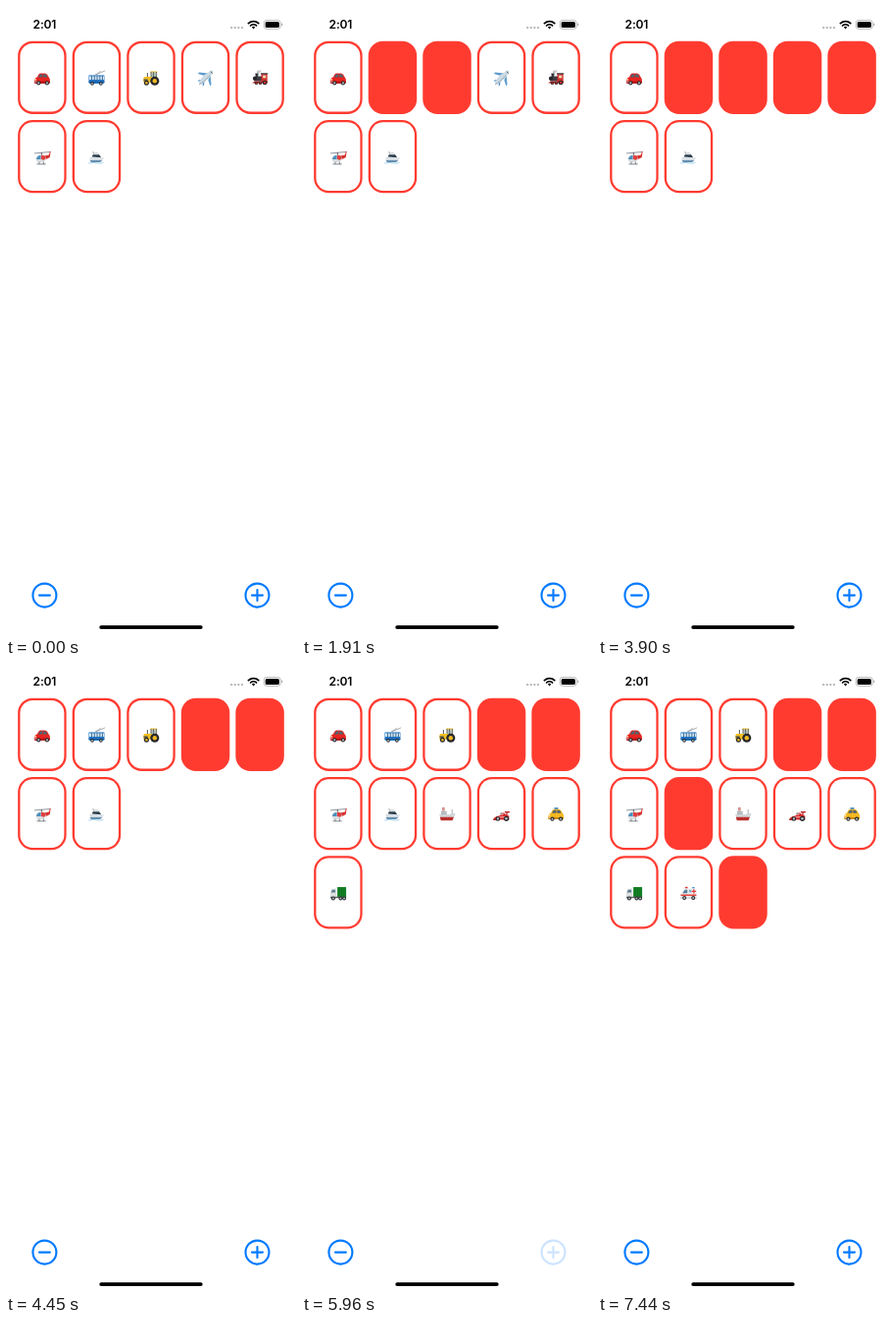
An HTML page that plays this animation: 296 by 640 pixels, repeating every 8 s.

```html
<!DOCTYPE html>
<html lang="en">
<head>
<meta charset="utf-8">
<title>Vehicle cards</title>
<style>
  html, body { margin: 0; width: 100%; height: 100%; overflow: hidden; background: #fff; }
  svg { display: block; width: 296px; height: 640px; }
  .clock { font: 600 12px Inter, Roboto, sans-serif; letter-spacing: -.15px; }
</style>
</head>
<body>
<svg id="stage" viewBox="0 0 296 640"></svg>
<script>
const LOOP = 8000;
const PT = 296 / 390; // device points to stage pixels
const RED = '#ff3b30', BLUE = '#007aff';

// Drawing helpers
const path = (d, fill) => `<path d="${d}" fill="${fill}"/>`;
const line = (d, color, w = 1) =>
  `<path d="${d}" fill="none" stroke="${color}" stroke-width="${w}" stroke-linecap="round" stroke-linejoin="round"/>`;
const dot = (x, y, r, fill) => `<circle cx="${x}" cy="${y}" r="${r}" fill="${fill}"/>`;
const box = (x, y, w, h, fill, r = 0) =>
  `<rect x="${x}" y="${y}" width="${w}" height="${h}" rx="${r}" fill="${fill}"/>`;
const wheel = (x, y, r = 2, hub = '#b9bec4') => dot(x, y, r, '#25272b') + dot(x, y, r * .5, hub);

const car = (paint, shade, extra = '') =>
  extra +
  path('M-8 2Q-7.8-.6-5.2-1L-3.4-4Q-2.9-4.9-1.6-4.9H2.8Q4.5-4.9 5.4-3.4L6.9-.7Q8 .2 8 2V4Q8 5.3 6.6 5.3H-6.8Q-8 5.3-8 4Z', paint) +
  path('M-8 3.4H8V4Q8 5.3 6.6 5.3H-6.8Q-8 5.3-8 4Z', shade) +
  path('M-4-1L-2.6-3.5Q-2.3-4-1.5-4H.4V-1Z', '#51626f') +
  path('M1.2-4H2.7Q3.9-4 4.5-3L5.5-1H1.2Z', '#51626f') +
  dot(-6.8, 1.4, .9, '#fff3cf') +
  box(-7.9, 3.2, 2.6, .8, '#d5d8db') +
  wheel(-3.6, 5, 2.1) + wheel(5, 5, 2.1);

const icons = [
  car('#e5241f', '#b01517'),
  // trolleybus
  line('M-1-3.4L8.4-7.4M-1-3.4L4-6.8', '#8a8f96', .7) +
  box(-8, -3.4, 16, 9, '#2478c8', 1.4) + box(-7.5, -3.4, 15, 1.1, '#7fb0dc', .5) +
  box(-7.6, -2, 15.2, 3.6, '#cfe6f5') +
  line('M-5-2V1.6M-2.2-2V1.6M.6-2V1.6M3.4-2V1.6M6-2V1.6', '#24527f', .8) +
  box(-8, 3.4, 16, 1, '#175592') + wheel(-4.4, 5.5, 1.8) + wheel(4.4, 5.5, 1.8),
  // tractor
  box(-.8, -6.8, 7, 1.1, '#e8b41c', .4) + box(0, -5.8, 5.4, 5.2, '#a9c4c6') +
  line('M0-6V0M2.6-6V0M5.6-6V0', '#5d5030', .8) + line('M-3.6-1V-5', '#444', .9) +
  path('M-7.6 0Q-7.6-1.4-6-1.4H1V4.4H-7.6Z', '#f2bf23') +
  box(-7.5, 1, 4.2, 2, '#5b5a43') +
  wheel(3.8, 2.9, 4.5, '#efba24') + wheel(-4.6, 4.9, 2.5, '#efba24'),
  // airplane
  path('M-1.8-2.6L-7.6-4.4L-6.5-5.8L2.8-4.9ZM2.8 1.8L4.7 7.8L6 6.6L5-2.8Z', '#5d9ccd') +
  path('M-4 3.2L-8 3.2L-7.2 2.1L-3.2 1.4ZM-2.8 4.2L-2.8 8.2L-1.6 7.4L-1 3.6Z', '#4d8dc2') +
  path('M-6.8 7.2Q-7-.2 5.4-7.3Q8.2-8.8 7.7-5.9Q6.8-3.4 2.3 1.2Q-2.9 6.1-6.8 7.2Z', '#cbd9e2') +
  line('M-5.8 6.1Q-2.4 4.9 4.4-2.6', '#8ca4b6', .8) + line('M5.5-6.5L6.9-5.2', '#33465a', .9),
  // locomotive
  dot(-1.6, -6.3, 1.5, '#bcbcbc') + dot(.2, -7.2, 1.2, '#d2d2d2') +
  path('M-4.8-4.8H-1.4L-2-1.5H-4.2Z', '#333437') +
  box(-6.2, -2, 8.6, 5, '#3b3d42', 1.4) + dot(-5.2, .4, 2, '#24262a') +
  box(1.4, -4.6, 6.2, 8.4, '#cc3029') + box(.8, -5.2, 7.4, 1.3, '#40434a', .4) +
  box(3, -2.8, 3.2, 2.8, '#f2d7b7') +
  path('M-5.4 3H8V5H-7.8Z', '#bd2923') +
  wheel(-3.6, 5, 1.7, '#d33') + wheel(.4, 5, 1.7, '#d33') + wheel(5, 4.6, 2.3, '#d33'),
  // helicopter
  line('M-7.6-3.8L8-5.2', '#777e86', .8) + line('M-.6-4.4V-2', '#555', 1) +
  path('M1.8-1.2L7-2.2L8.1-6.2L8.7-5.6L7.9 .2L2 3.2Z', '#d7322f') +
  path('M-6.2 2.4Q-5.5-2.2-.6-2.3Q4-2.2 4 1.6Q3.2 5.2-1.8 5.6Q-6 5.6-6.2 2.4Z', '#d9dde1') +
  path('M-5.8 1.6Q-5-1.6-1.4-1.6V2.2H-5.8Z', '#4b91bf') +
  path('M-1-1.8Q3.4-2 3.8 1.2L2 3L-1 2.2Z', '#de403b') +
  line('M-5 7.2H3.4M-3 5.4V7M1.4 5V7', '#606870', .8),
  // motor boat
  path('M-4.8-.2L-3.2-3.2Q0-5.2 2.4-3L4.8 .6Z', '#2f3f4d') +
  path('M-2.8-3.6Q0-5.4 2.2-3.4L3-2.5H-3.4Z', '#e5e9ec') + line('M-2.8-4L-3.8-5.4', '#777', .6) +
  path('M-7.2 .6L7.6 .9Q5.6 4.8 3.2 5.4H-5.2Q-7 4-7.2 .6Z', '#d6dde3') +
  path('M-6.9 3.2H5.6Q4.4 5 3.2 5.4H-5.2Q-6.5 4.6-6.9 3.2Z', '#638faf') +
  line('M-7.8 6.3Q-3 5.2 0 6.2T6.6 5.9', '#a9d5ee', 1),
  // ship
  box(-4.8, -6.4, 2.3, 3.6, '#be3430') + box(-4.8, -5.3, 2.3, 1, '#f4f4f4') +
  box(-6.4, -3.4, 6.4, 3.8, '#e7e9eb') + line('M-5.6-1.9H-.8M-5.6-.4H-.8', '#596d7f', .6) +
  line('M5.2 .4V-4.3', '#888', .7) +
  path('M-7.8 .4H1.6L8.6-1Q7.6 3.6 6 4H-6.8Z', '#d3d6d9') +
  path('M-7.2 3H6.9L5.6 6.6H-6.3Z', '#ba302d'),
  // racing car
  line('M5.5 1V-1.8M3.8-2H8', '#b51d22', 1.2) +
  path('M-8 4.4Q-6 1.8-1.6 1.5L.2-.8Q2.4-2.2 4.2 .2L7.8 1.8V5.8H-8Z', '#d9262a') +
  dot(.4, -.5, 1.5, '#f0d6d4') + line('M-.6-.5H.8', '#31343a', .8) +
  box(-8.4, 5.2, 5, 1, '#961920') + line('M-2 3.2L4 3', '#fff', .7) +
  wheel(-3.6, 4.8, 2.3) + wheel(5, 4.6, 2.6),
  car('#f6b91f', '#c78712', box(-1.6, -6.6, 4, 2, '#4a93c8', .5)),
  // truck
  box(-.8, -6, 9, 11, '#168427', .3) + line('M1.4-5.4V4.4M3.7-5.4V4.4M6-5.4V4.4', '#0c681d', .6) +
  path('M-8-.6L-6.6-4.2H-1.2V5.4H-8Z', '#dce0e2') + path('M-7.2-.4L-6-3.2H-3V-.4Z', '#5c7b8e') +
  box(-8, 3.8, 16, 1.4, '#5b6268') +
  wheel(-5, 5.5, 2) + wheel(2.4, 5.5, 1.9) + wheel(6.2, 5.5, 1.9),
  // ambulance
  box(-3.6, -6.2, 2.8, 1.7, '#e43a35', .5) + box(3.6, -6, 2.6, 1.5, '#3f8fd2', .5) +
  path('M-8 1L-4.6-3.9Q-4.2-4.6-3-4.6H7Q8-4.6 8-3.4V5.2H-8Z', '#eceef0') +
  path('M-6.2 .2L-3.8-3.3H-1.2V.2Z', '#567f9c') + box(.4, -3.2, 2.4, 2.7, '#7eaac5') +
  box(-8, 1.5, 16, 1.5, '#e4443b') + line('M5.4-3.4V.2M3.6-1.6H7.2', '#df3832', 1.1) +
  line('M-8 5.1H8', '#aeb3b8', .8) + wheel(-4.3, 5, 2) + wheel(4.8, 5, 2),
  car('#f1f2f3', '#2f3439', box(-.8, -6.2, 2.6, 1.6, '#3577d0', .4)),
];

// When each card appears, and when it is turned over
const adds = [0, 0, 0, 0, 0, 0, 0, 5390, 5600, 5780, 5960, 6290, 6500];
const flips = { 1: [1550, 4450], 2: [1910, 4190], 3: [2430], 4: [2820], 6: [7440], 12: [7040] };
// Plus button opacity: [from time, value]
const press = [[0, 1], [5280, .2], [6110, .55], [6290, .2], [6610, .6], [6720, 1]];

const CARD_W = 65.2 * PT, CARD_H = 97.8 * PT, GAP = 8 * PT;

function card(icon, i) {
  const x = 16 * PT + (i % 5) * (CARD_W + GAP);
  const y = 47 * PT + Math.floor(i / 5) * (CARD_H + GAP);
  const edge = 3 * PT, r = 20 * PT;
  return `<g class="card" transform="translate(${x} ${y})">
    ${box(0, 0, CARD_W, CARD_H, RED, r)}
    <g class="face">${box(edge, edge, CARD_W - 2 * edge, CARD_H - 2 * edge, '#fff', r - edge)}
    <g transform="translate(${CARD_W / 2} ${CARD_H / 2 + .6})">${icon}</g></g></g>`;
}

const button = (id, x, sign) => `<g id="${id}" transform="translate(${x} 599.6)">
  <circle r="12" fill="none" stroke="${BLUE}" stroke-width="2.1"/>${line(sign, BLUE, 2.1)}</g>`;

const statusBar = `<text class="clock" x="27.6" y="23">2:01</text>` +
  [0, 1, 2, 3].map(i => box(229 + i * 3.6, 21, 2.3, 2.1, '#b8b8b8', .9)).join('') +
  `<g transform="translate(252.6 23)">
    ${line('M-5.1-5.4A7.5 7.5 0 0 1 5.1-5.4', '#000', 1.9)}
    ${line('M-3-3A4.3 4.3 0 0 1 3-3', '#000', 1.7)}
    ${path('M0 .4L-1.7-1.4A2.5 2.5 0 0 1 1.7-1.4Z', '#000')}</g>` +
  `<rect x="263.3" y="14.5" width="17" height="8.8" rx="2.7" fill="none" stroke="#a6a6a6" stroke-width=".8"/>` +
  box(264.7, 15.9, 14.2, 6, '#000', 1.5) +
  path('M281.3 17.3Q282.6 18 282.6 18.9T281.3 20.5Z', '#a6a6a6');

const stage = document.getElementById('stage');
stage.innerHTML = statusBar + icons.map(card).join('') +
  button('minus', 39.4, 'M-5.5 0H5.5') +
  button('plus', 256.5, 'M-5.5 0H5.5M0-5.5V5.5') +
  box(95.3, 630.2, 105.4, 3.8, '#000', 1.9);

const cards = [...stage.querySelectorAll('.card')];
const faces = [...stage.querySelectorAll('.face')];
const plus = document.getElementById('plus');
const show = (el, on) => el.setAttribute('visibility', on ? 'visible' : 'hidden');

function draw(now) {
  const t = now % LOOP;
  cards.forEach((el, i) => {
    const added = t >= adds[i];
    const turns = (flips[i] || []).filter(f => t >= f).length;
    show(el, added);
    show(faces[i], added && turns % 2 === 0);
  });
  plus.setAttribute('opacity', press.filter(([from]) => t >= from).pop()[1]);
}

const start = performance.now();
function tick() {
  draw(performance.now() - start);
  requestAnimationFrame(tick);
}
tick();
</script>
</body>
</html>
```
